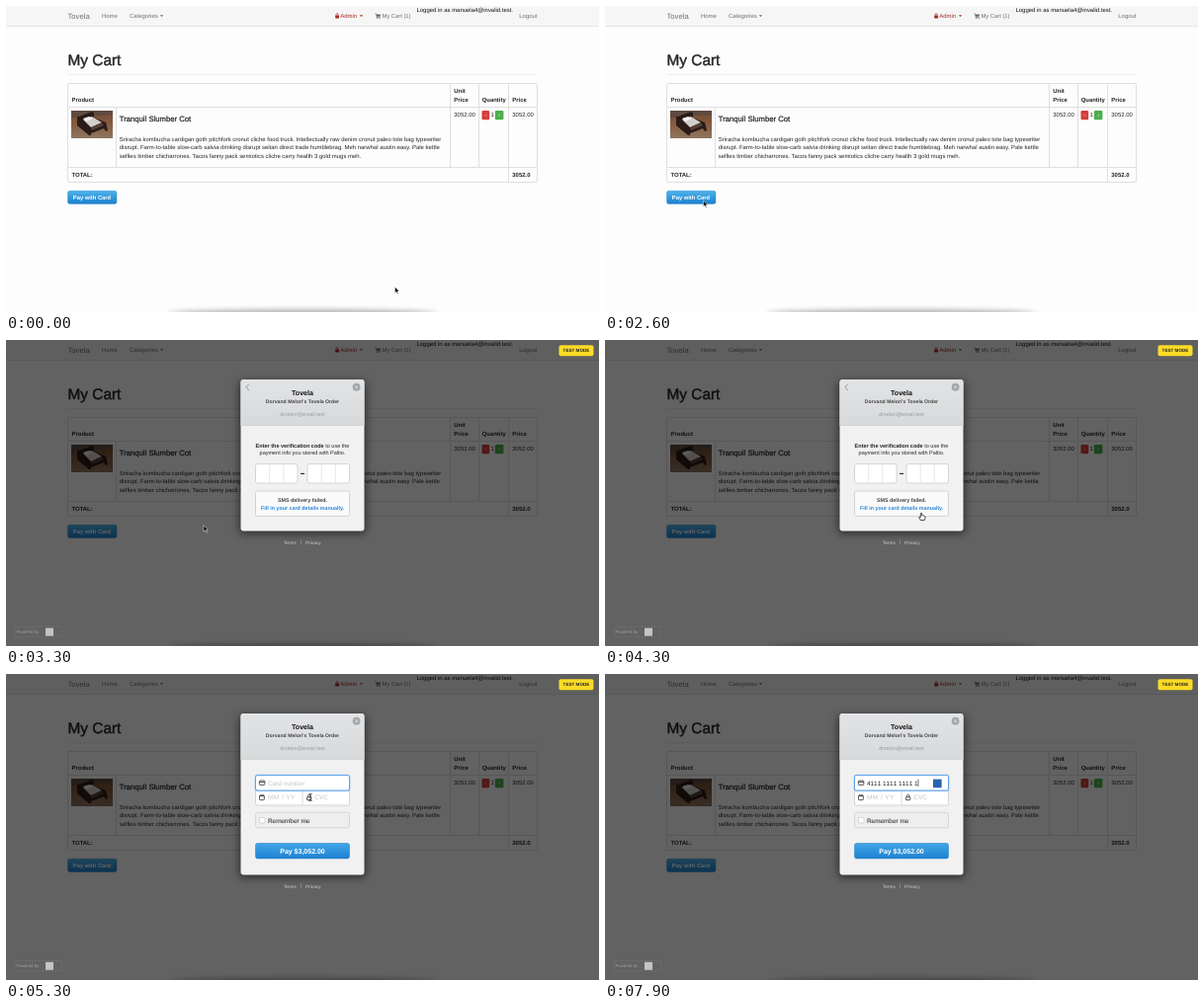
Write an HTML page that moves like this. It is 600 px wide and 310 px high and loops after 8 s.

```html
<!DOCTYPE html>
<html lang="en">
<head>
<meta charset="utf-8">
<title>My Cart</title>
<style>
html, body { margin: 0; width: 100%; height: 100%; overflow: hidden; background: #fdfdfd; }
svg { display: block; width: 100vw; height: 100vh; font: 5.95px "Liberation Sans", Arial, sans-serif; fill: #000; }
text { fill: #262626; text-rendering: geometricPrecision; white-space: pre; }
.b { font-weight: bold; }
.nav text { fill: #707070; }
.h1 { font-size: 15.4px; stroke: #262626; stroke-width: .45px; }
.h4 { font-size: 7.7px; stroke: #262626; stroke-width: .22px; }
.mid { text-anchor: middle; }
.line { fill: none; stroke: #e0e0e0; }
.field { fill: #fff; stroke: #c9cbcd; stroke-width: .8; }
.ico { fill: none; stroke: #444; stroke-width: .9; }
.in text { font-size: 6.4px; }
.in .hint { fill: #bfc3c7; }
.foot text { font-size: 4.8px; fill: #ccc; }
.copy text { font-size: 5.5px; }
.copy .sms { font-size: 5.35px; }
#typed { font-kerning: none; fill: #222; }
</style>
</head>
<body>
<svg viewBox="0 0 600 310" preserveAspectRatio="none">
<defs>
  <linearGradient id="blue" x2="0" y2="1"><stop stop-color="#4db3ea"/><stop offset="1" stop-color="#1c80cf"/></linearGradient>
  <linearGradient id="pay" x2="0" y2="1"><stop stop-color="#42a6e6"/><stop offset="1" stop-color="#1f82d2"/></linearGradient>
  <linearGradient id="head" x2="0" y2="1"><stop stop-color="#e2e3e5"/><stop offset="1" stop-color="#d7d9db"/></linearGradient>
  <linearGradient id="floor" x2="0" y2="1"><stop stop-color="#6a4c3a"/><stop offset=".4" stop-color="#84583a"/><stop offset="1" stop-color="#8f7560"/></linearGradient>
  <filter id="soft" x="-20%" y="-150%" width="140%" height="400%"><feGaussianBlur stdDeviation="2.5"/></filter>
  <filter id="shade" x="-20%" y="-20%" width="140%" height="140%"><feGaussianBlur stdDeviation="4"/></filter>
  <clipPath id="photo"><rect x="66" y="106" width="42" height="28"/></clipPath>
</defs>

<rect width="600" height="310" fill="#fdfdfd"/>

<!-- navigation -->
<g class="nav">
  <rect width="600" height="20" fill="#f6f6f6"/>
  <path d="M0 20.5H600" stroke="#e6e6e6"/>
  <text x="62.5" y="12.7" style="font-size:7.7px">Tovela</text>
  <text x="97" y="12.2">Home</text>
  <text x="125" y="12.2">Categories</text>
  <path d="M155.8 9.2h3.4l-1.7 1.8z" fill="#666"/>
  <rect x="333.2" y="9.6" width="3.8" height="2.8" rx=".4" fill="#a52a22"/>
  <path d="M334 9.8v-1.1a1.1 1.1 0 0 1 2.2 0v1.1" fill="none" stroke="#a52a22" stroke-width=".7"/>
  <text x="338.2" y="12.2" style="fill:#a52a22">Admin</text>
  <path d="M357.9 9.2h3.2l-1.6 1.8z" fill="#a52a22"/>
  <path d="M374.6 8.6h4.4l-.5 2.2h-3.4z" fill="#666"/>
  <path d="M373.4 7.8h1l.8 3.8h3.4" fill="none" stroke="#666" stroke-width=".6"/>
  <circle cx="375.6" cy="12.5" r=".6" fill="#666"/><circle cx="378.2" cy="12.5" r=".6" fill="#666"/>
  <text x="380.5" y="12.2" style="font-size:5.8px">My Cart (1)</text>
  <text x="415.5" y="6.1" style="fill:#111">Logged in as manuela4@invalid.test.</text>
  <text x="519.3" y="12.2">Logout</text>
</g>

<text class="h1" x="62.5" y="59.5">My Cart</text>
<path d="M62.5 69.5H537.5" stroke="#eee"/>

<!-- cart table -->
<rect class="line" x="62.5" y="78.5" width="475" height="100" rx="1.5"/>
<path class="line" d="M62.5 102.5H537.5M62.5 163.5H537.5M111.5 102.5V163M449.5 78.5V163M478.5 78.5V163M508.5 78.5V178"/>
<g class="b">
  <text x="66.5" y="96.8">Product</text>
  <text x="453.3" y="88.3">Unit</text>
  <text x="453.3" y="96.8">Price</text>
  <text x="481.7" y="96.8">Quantity</text>
  <text x="512.3" y="96.8">Price</text>
  <text x="66.5" y="172.9">TOTAL:</text>
  <text x="512.3" y="172.9">3052.0</text>
</g>
<g clip-path="url(#photo)">
  <rect x="66" y="106" width="42" height="28" fill="url(#floor)"/>
  <path d="M66 106h42v4l-42 3z" fill="#5f4a40"/>
  <path d="M72 112h2l13-5 2 1v5l12 5 2 8-2 1-2-3-13 5v2h-2l-12-10z" fill="#2a1b16"/>
  <path d="M78 115l9-3 10 6-11 5z" fill="#d3cfcd"/>
  <path d="M78 114l6-2 4 2-7 3z" fill="#f3f1f0"/>
  <path d="M86 123l11-5 2 3-12 5z" fill="#54423a"/>
</g>
<text class="h4" x="114.8" y="116.8">Tranquil Slumber Cot</text>
<text x="114.8" y="136.6">Sriracha kombucha cardigan goth pitchfork cronut cliche food truck. Intellectually raw denim cronut paleo tote bag typewriter</text>
<text x="114.8" y="145.1">disrupt. Farm-to-table slow-carb salvia drinking disrupt seitan direct trade humblebrag. Meh narwhal austin easy. Pale kettle</text>
<text x="114.8" y="153.6">selfies timber chicharrones. Tacos fanny pack semiotics cliche carry health 3 gold mugs meh.</text>
<text x="453.3" y="112.3">3052.00</text>
<rect x="481.5" y="106" width="7.7" height="9.2" rx="1.3" fill="#d43f3a"/>
<path d="M484.4 110.8h2" stroke="#f3b5b2" stroke-width=".7"/>
<text x="490.4" y="112.3">1</text>
<rect x="494.8" y="106" width="8.6" height="9.2" rx="1.3" fill="#4cae4c"/>
<path d="M498 110.7h2.2M499.1 109.6v2.2" stroke="#a5d8a5" stroke-width=".6"/>
<text x="512.3" y="112.3">3052.00</text>

<rect x="62.5" y="187.3" width="49.5" height="13.2" rx="2" fill="url(#blue)" stroke="#2a86cc" stroke-width=".4"/>
<text class="b" x="67.8" y="196.2" style="font-size:5.8px;fill:#fff">Pay with Card</text>

<ellipse cx="300" cy="311" rx="136" ry="3.5" opacity=".3" filter="url(#soft)"/>

<!-- checkout -->
<g id="checkout">
  <rect width="600" height="310" opacity=".61"/>
  <rect x="559.5" y="5.2" width="35" height="11" rx="2" fill="#fbdc26"/>
  <text class="b mid" x="577" y="12.4" style="font-size:4.6px;fill:#222">TEST MODE</text>
  <rect x="9.2" y="290.5" width="47.5" height="10.5" rx="1.5" fill="none" stroke="#858585" stroke-width=".5" stroke-dasharray="1 1"/>
  <text x="10.5" y="297.3" style="font-size:4.3px;fill:#a0a0a0">Powered by</text>
  <rect x="40" y="291.8" width="8" height="8" fill="#c4c4c4"/>

  <rect id="shadow" x="236" y="42" width="128" height="164" rx="4" opacity=".55" filter="url(#shade)"/>
  <rect id="panel" x="237.5" y="40" width="125" height="163.5" rx="3" fill="#f1f1f2"/>
  <path d="M237.5 86.5V43a3 3 0 0 1 3-3h119a3 3 0 0 1 3 3v43.5z" fill="url(#head)"/>
  <path d="M237.5 86.5h125" stroke="#cccdcf" stroke-width=".7"/>
  <path id="back" d="M245.8 44.6l-2.8 3.2 2.8 3.2" fill="none" stroke="#85888b" stroke-width=".8"/>
  <circle cx="354.6" cy="47.7" r="3.9" fill="#a3a6a9"/>
  <path d="M353.1 46.2l3 3m0-3l-3 3" stroke="#eee" stroke-width=".8"/>
  <g class="b mid">
    <text x="300" y="55.6" style="font-size:7.1px;fill:#111">Tovela</text>
    <text x="300" y="64" style="font-size:5.15px;fill:#444">Dorvand Melori's Tovela Order</text>
  </g>
  <text class="mid" x="300" y="77" style="font-size:5.3px;fill:#999">dmelori@email.test</text>

  <g id="form" class="in">
    <rect class="field" x="252.5" y="102.6" width="95" height="30.4" rx="2"/>
    <path class="line" d="M252.5 118H347.5M300 118V133" style="stroke:#cfd1d3;stroke-width:.8"/>
    <g id="focus">
      <rect x="252.5" y="102.6" width="95" height="15.4" rx="2" fill="none" stroke="#8fc3f5" stroke-width="2.2" opacity=".55"/>
      <rect x="252.5" y="102.6" width="95" height="15.4" rx="2" fill="#fff" stroke="#4d9ae6" stroke-width=".9"/>
    </g>
    <rect class="ico" x="256.4" y="108" width="5.4" height="4.4" rx=".7"/>
    <path class="ico" d="M256.4 109.5h5.4"/>
    <rect class="ico" x="256.5" y="123" width="4.8" height="4.6" rx=".6"/>
    <path class="ico" d="M256.5 123.6h4.8M257.8 122v1M260 122v1"/>
    <rect class="ico" x="304.6" y="124.6" width="4.2" height="3.1" rx=".4"/>
    <path class="ico" d="M305.5 124.6v-1.1a1.2 1.2 0 0 1 2.4 0v1.1"/>
    <text id="hint" class="hint" x="265" y="112.6">Card number</text>
    <text id="typed" x="265" y="112.6"></text>
    <rect id="caret" y="106.6" width=".7" height="7.4" fill="#333"/>
    <rect id="brand" x="332" y="106.6" width="8.6" height="8.6" fill="#2b62ad"/>
    <text class="hint" x="265" y="127.4" style="letter-spacing:.5px">MM / YY</text>
    <text class="hint" x="312.3" y="127.4">CVC</text>
    <rect x="252.5" y="140.2" width="95" height="15.6" rx="2" fill="#eeeeef" stroke="#cfd0d2" stroke-width=".8"/>
    <rect class="field" x="256.4" y="145.4" width="5.6" height="5.6" rx="1"/>
    <text x="265" y="150.5" style="fill:#444;stroke:#444;stroke-width:.12px">Remember me</text>
    <rect x="252.5" y="171.5" width="95" height="15.4" rx="2" fill="url(#pay)" stroke="#1d78bd" stroke-width=".5"/>
    <text class="b mid" x="300" y="181.6" style="font-size:7px;fill:#fff">Pay $3,052.00</text>
  </g>

  <g id="verify" class="copy mid">
    <text x="300" y="108.6"><tspan class="b" fill="#222">Enter the verification code</tspan> to use the</text>
    <text x="300" y="116.2">payment info you stored with Paltio.</text>
    <rect class="field" x="252.5" y="125.6" width="42.5" height="19.4" rx="2"/>
    <rect class="field" x="305" y="125.6" width="42.5" height="19.4" rx="2"/>
    <path class="line" d="M266.7 126V145M280.8 126V145M319.2 126V145M333.3 126V145" style="stroke-width:.8"/>
    <path d="M298 135.4h4" stroke="#222" stroke-width="1.1"/>
    <rect class="field" x="252.5" y="153" width="95" height="25.4" rx="2" style="fill:#fafafa"/>
    <text class="b sms" x="300" y="164" style="fill:#444">SMS delivery failed.</text>
    <text class="b sms" x="300" y="172" style="fill:#2684d8">Fill in your card details manually.</text>
  </g>

  <g id="foot" class="foot">
    <text x="280.8" y="216.6">Terms</text>
    <path d="M298.5 212.6v4.6" stroke="#aaa" stroke-width=".5"/>
    <text x="303" y="216.6">Privacy</text>
  </g>
</g>

<g id="pointer">
  <path id="arrow" d="M0 0v6.3l1.5-1.3 1 2.3 1-.4-1-2.3h2z" fill="#000" stroke="#fff" stroke-width=".5"/>
  <path id="hand" d="M-.7.4Q0-.4.7.4V2.6Q1.5 2.1 2 2.9 2.8 2.6 3.2 3.3 4 3.2 4 4V5.4L3.2 7.2H-.6L-2.4 4.4Q-2.3 3.4-.7 4.3z" fill="#fff" stroke="#000" stroke-width=".7"/>
  <path id="beam" d="M-1.5-3.6Q0-3.6 0-2.6 0-3.6 1.5-3.6M0-2.6V2.6M-1.5 3.6Q0 3.6 0 2.6 0 3.6 1.5 3.6" fill="none" stroke="#222" stroke-width=".8"/>
</g>
</svg>
<script>
const LOOP = 8000, STEP = 100, OPEN = 2800;
const $ = id => document.getElementById(id);

// Rows: time in ms, then values
const PATH = [
  [0, 393.5, 284.5], [100, 375, 280], [200, 375, 280], [300, 330, 266], [400, 274, 249.5],
  [600, 274, 249.5], [900, 190, 222], [1200, 130, 205], [1500, 99.5, 196.5], [1600, 99.5, 197],
  [2800, 99.5, 197], [3200, 170, 190], [3600, 290, 181], [3900, 320, 175.3],
  [4400, 320, 175.3], [4700, 308, 125]
];
const VERIFY = [[2800, 0], [3200, 1], [4400, 1], [4700, 0]];
const BACK = [[2800, .35], [3200, 1], [4400, 1], [4700, 0]];
const FOCUS = [[4500, 0], [4700, .65], [4900, 1]];
const KEYS = [5600, 5800, 6000, 6200, 6400, 6600, 6800, 7000, 7100, 7300, 7400, 7600, 7800];

function at(rows, t) {
  const i = rows.findIndex(r => r[0] > t);
  if (i === 0) return rows[0].slice(1);
  if (i < 0) return rows[rows.length - 1].slice(1);
  const a = rows[i - 1], b = rows[i], k = (t - a[0]) / (b[0] - a[0]);
  return a.slice(1).map((v, j) => v + (b[j + 1] - v) * k);
}

const fade = (id, v) => $(id).setAttribute('opacity', v);
const show = (id, on) => { $(id).style.display = on ? '' : 'none'; };

function draw(t) {
  const [v] = at(VERIFY, t);
  show('checkout', t >= OPEN);
  fade('form', 1 - v);
  fade('verify', v);
  fade('back', at(BACK, t)[0]);
  fade('focus', at(FOCUS, t)[0]);
  $('panel').setAttribute('height', 163.5 - 10 * v);
  $('shadow').setAttribute('height', 164 - 10 * v);
  $('foot').setAttribute('transform', `translate(0 ${-10 * v})`);

  const n = KEYS.filter(k => k <= t).length;
  const digits = ('4' + '1'.repeat(12)).slice(0, n);
  const gaps = Math.max(0, Math.ceil(n / 4) - 1);
  $('typed').textContent = digits.replace(/(.{4})(?=.)/g, '$1 ');
  $('caret').setAttribute('x', 265 + 6.4 * (n * .556 + gaps * .278));
  show('hint', !n);
  show('brand', n);
  show('caret', n || (t >= 4600 && t < 5200));

  const [x, y] = at(PATH, t);
  $('pointer').setAttribute('transform', `translate(${x} ${y})`);
  const hand = t >= 3800 && t < 4500, beam = t >= 4600;
  show('pointer', !n);
  show('hand', hand);
  show('beam', beam);
  show('arrow', !hand && !beam);
}

const start = performance.now();
function tick() {
  const t = (performance.now() - start) % LOOP;
  draw(Math.floor(t / STEP) * STEP);
  requestAnimationFrame(tick);
}
tick();
</script>
</body>
</html>
```
